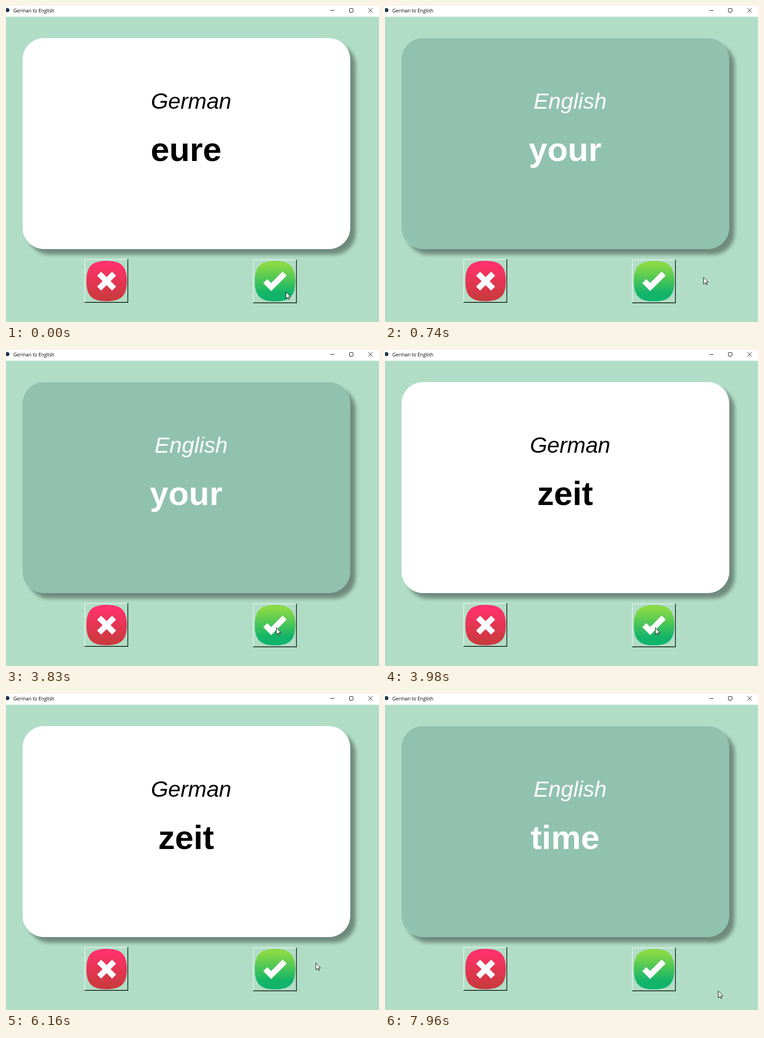
Write an HTML page that moves like this. It is 812 px wide and 689 px high and loops after 8 s.

```html
<!DOCTYPE html>
<html lang="en">
<head>
<meta charset="utf-8">
<title>German to English</title>
<style>
  html, body { margin: 0; width: 100%; height: 100%; overflow: hidden; background: #b1ddc6; }
  svg { display: block; }
  text { font-family: "Liberation Sans", Arial, sans-serif; text-anchor: middle; }
  #language { font-size: 48.5px; font-style: italic; }
  #word { font-size: 73px; font-weight: bold; }
  #caption { font: 10.4px "Open Sans", sans-serif; text-anchor: start; }
  .line { fill: none; stroke: #000; }
  .mark { fill: none; stroke: #fff; stroke-width: 12.5; }
</style>
</head>
<body>
<svg width="812" height="689" viewBox="0 0 812 689">
  <defs>
    <filter id="blur" x="-5%" y="-5%" width="110%" height="110%"><feGaussianBlur stdDeviation="4"/></filter>
    <linearGradient id="red" x2="0" y2="1">
      <stop offset=".1" stop-color="#ff316a"/><stop offset=".95" stop-color="#c93a3d"/>
    </linearGradient>
    <linearGradient id="green" x2="0" y2="1">
      <stop offset=".1" stop-color="#88d944"/><stop offset=".8" stop-color="#12b46a"/>
    </linearGradient>
    <path id="squircle" d="M0-44C32-44 44-32 44 0S32 44 0 44S-44 32-44 0S-32-44 0-44Z"/>
    <g id="relief" fill="none">
      <path d="M.5 94V.5H94" stroke="#fff"/>
      <path d="M0 94.3H94.3V0" stroke="#000" stroke-width="1.4"/>
    </g>
  </defs>

  <rect width="812" height="689" fill="#b1ddc6"/>
  <rect width="812" height="23.5" fill="#fff"/>
  <circle cx="3" cy="9" r="4.5" fill="#1c3550"/>
  <text id="caption" x="16" y="13.7">German to English</text>
  <path class="line" d="M706 9.5h9M789 5l9 9m0-9l-9 9"/>
  <rect class="line" x="747.5" y="5.5" width="8" height="8" rx="1"/>

  <rect x="47.5" y="82" width="713.5" height="460" rx="47" opacity=".37" filter="url(#blur)"/>
  <rect id="card" x="36" y="70" width="713.5" height="460" rx="47"/>
  <text id="language" x="403" y="224"></text>
  <text id="word" x="392" y="338"></text>

  <use href="#relief" x="171" y="552"/>
  <use href="#squircle" x="219" y="599.7" fill="url(#red)"/>
  <path class="mark" d="M202.7 583.6l32.6 32.6m0-32.6l-32.6 32.6"/>
  <use href="#relief" x="538" y="553"/>
  <use href="#squircle" x="585.7" y="600" fill="url(#green)"/>
  <path class="mark" d="M564.5 599.9l12.8 12.8l29.4-29.4"/>

  <path id="cursor" d="M.5.5V15.5L4 12.2L6.4 17.2L8.4 16.3L6.1 11.3H10.7Z" fill="#fff" stroke="#000"/>
</svg>
<script>
const LOOP = 8000;
const SAMPLE = 130; // approximate time between pointer updates
const byId = id => document.getElementById(id);

const cards = [
  { from: 0, language: "German", word: "eure" },
  { from: 740, language: "English", word: "your" },
  { from: 3980, language: "German", word: "zeit" },
  { from: 6970, language: "English", word: "time" },
];

// Each glide makes its first jump at `from` and arrives at x, y at `to`.
const home = { x: 609, y: 623 };
const glides = [
  { from: 500, to: 740, x: 693, y: 591 },
  { from: 1570, to: 1990, x: 587, y: 600 },
  { from: 2660, to: 3050, x: 234, y: 617 },
  { from: 3170, to: 3560, x: 623, y: 594 },
  { from: 3710, to: 3830, x: 588, y: 605 },
  { from: 4820, to: 4940, x: 674, y: 586 },
  { from: 7840, to: 7960, x: 725, y: 647 },
];

const smooth = p => p * p * (3 - 2 * p);

function progress({ from, to }, t) {
  const gaps = Math.round((to - from) / SAMPLE);
  const jumps = Math.floor((t - from) / (to - from) * gaps) + 1;
  return smooth(Math.min(1, Math.max(0, jumps / (gaps + 1))));
}

function pointerAt(t) {
  let { x, y } = home;
  for (const glide of glides) {
    const p = progress(glide, t);
    x += (glide.x - x) * p;
    y += (glide.y - y) * p;
  }
  return `${Math.round(x)} ${Math.round(y)}`;
}

function draw(t) {
  const card = cards.findLast(({ from }) => from <= t);
  const front = card.language === "German";
  byId("card").setAttribute("fill", front ? "#fff" : "#91c2af");
  for (const id of ["language", "word"]) {
    byId(id).textContent = card[id];
    byId(id).setAttribute("fill", front ? "#000" : "#fff");
  }
  byId("cursor").setAttribute("transform", `translate(${pointerAt(t)})`);
}

const begin = performance.now();
function tick() {
  draw((performance.now() - begin) % LOOP);
  requestAnimationFrame(tick);
}
tick();
</script>
</body>
</html>
```
